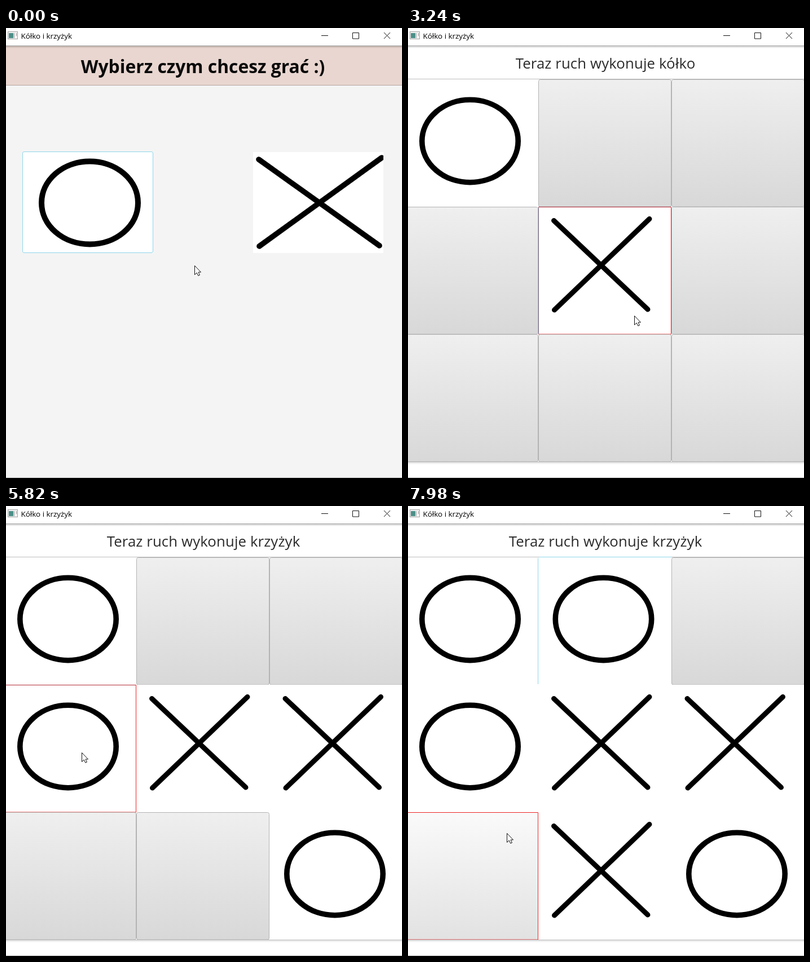
An HTML page for the animation above (8000 ms loop, 702 by 798 pixels).

```html
<!DOCTYPE html>
<html lang="pl">
<head>
<meta charset="utf-8">
<style>
  html, body { margin: 0; width: 100%; height: 100%; overflow: hidden; background: #fff; }
  svg { display: block; width: 702px; height: 798px; }
  text { font-family: "Open Sans", "Noto Sans", sans-serif; }
  .title { font-size: 13.4px; fill: #000; }
  .head { font-size: 31.8px; font-weight: 700; fill: #0a0a0a; text-anchor: middle; }
  .turn { font-family: "Comic Sans MS", "Comic Neue", "Open Sans", sans-serif; font-size: 25.8px; letter-spacing: .1px; fill: #2b2b2b; text-anchor: middle; }
  .ink { fill: none; stroke: #000; stroke-linecap: round; }
  .line { fill: none; stroke-width: 1; }
</style>
</head>
<body>
<svg viewBox="0 0 702 798" xmlns="http://www.w3.org/2000/svg">
  <defs>
    <linearGradient id="idle" x2="0" y2="1"><stop stop-color="#efefef"/><stop offset="1" stop-color="#d8d8d8"/></linearGradient>
    <linearGradient id="over" x2="0" y2="1"><stop stop-color="#fafafa"/><stop offset="1" stop-color="#e2e2e2"/></linearGradient>
    <linearGradient id="down" x2="0" y2="1"><stop stop-color="#e6e6e6"/><stop offset="1" stop-color="#d0d0d0"/></linearGradient>
    <linearGradient id="shade" x2="0" y2="1"><stop stop-color="#000" stop-opacity=".2"/><stop offset="1" stop-color="#000" stop-opacity="0"/></linearGradient>
    <clipPath id="tile"><rect x="438" y="220" width="231" height="179"/></clipPath>
  </defs>

  <g id="menu">
    <rect y="31" width="702" height="767" fill="#f4f4f4"/>
    <rect y="31" width="702" height="70" fill="#e9d6d0"/>
    <path class="line" d="M0 101.5H702" stroke="#b5a5a0"/>
    <text class="head" x="349" y="80">Wybierz czym chcesz grać :)</text>
    <rect x="30" y="220" width="231" height="179" fill="#fff"/>
    <ellipse class="ink" cx="148.5" cy="310" rx="85.5" ry="73.5" stroke-width="10"/>
    <rect id="pick" class="line" x="29.5" y="219.5" width="231" height="179" rx="2.5"/>
    <rect x="438" y="220" width="231" height="179" fill="#fff"/>
    <path class="ink" clip-path="url(#tile)" d="M448 233L662 386M449 387L666 230" stroke-width="9.6"/>
  </g>

  <g id="game">
    <rect y="31" width="702" height="767" fill="#fff"/>
    <text id="turn" class="turn" x="350" y="72"></text>
    <g id="cells"></g>
    <path class="line" d="M0 90.5H702M0 769.5H702" stroke="#bdbdbd"/>
    <rect y="770" width="702" height="4" fill="url(#shade)" opacity=".6"/>
    <g id="focus"></g>
  </g>

  <g id="bar">
    <rect width="702" height="31" fill="#fff"/>
    <rect y="32" width="702" height="4" fill="url(#shade)"/>
    <path class="line" d="M0 31.5H702" stroke="#a6a6a6"/>
    <rect x="3.5" y="6.5" width="17" height="13" fill="#f3f3f3" stroke="#a2a2a2"/>
    <rect x="5" y="9" width="8" height="9" fill="#4b8f88"/>
    <path class="line" d="M14.5 9V18M18.5 9V14" stroke="#9a9a9a"/>
    <text class="title" x="26.5" y="19">Kółko i krzyżyk</text>
    <path class="line" d="M559 13.5H571M614.5 8.5H625.5V19H614.5ZM670 8L681 19M681 8L670 19" stroke="#111"/>
    <path class="line" d="M0 797.5H702" stroke="#b4b4b4"/>
  </g>

  <path id="cursor" d="M.5 .5V16.5L4.2 13L6.8 18.3L9.4 17.1L7 12H11.5Z" fill="#fff" stroke="#111" stroke-width="1"/>
</svg>

<script>
const LOOP = 8000, GAME = 1450, WAKE = 1850;
const RED = '#ee2222', SKY = '#8fd6ea';
const LEFT = [-5, 231, 467], TOP = [91, 317, 543];

// start, end, number of steps, bend point, goal
const moves = [
  [200, 750, 8, [385, 640], [210, 331]],
  [1850, 1927, 2, [200, 285], [185, 240]],
  [2230, 2630, 6, [270, 340], [385, 480]],
  [3240, 3630, 6, [424.5, 572], [560, 640]],
  [4176, 4710, 8, [565, 550], [549, 448]],
  [5200, 5665, 7, [340, 455], [134, 437]],
  [5970, 6440, 7, [220, 560], [340, 640]],
  [7050, 7430, 6, [340, 430], [358, 237]],
  [7740, 7980, 4, [280, 400], [175, 580]]
];

// cell, press, release, sign
const plays = [
  [0, 2003, 2080, 'O'], [4, 2780, 2860, 'X'], [8, 3930, 4100, 'O'], [5, 4880, 4950, 'X'],
  [3, 5742, 5820, 'O'], [7, 6590, 6670, 'X'], [1, 7510, 7590, 'O']
];

const $ = id => document.getElementById(id);
const show = (id, on) => $(id).style.display = on ? '' : 'none';

function pointer(t) {
  let pos = [334, 421];
  for (const [from, to, n, bend, goal] of moves) {
    if (t < from) break;
    const step = Math.floor((t - from) * (n - 1) / (to - from) + 1e-6) + 1;
    const s = Math.min(step, n) / n, r = 1 - s;
    pos = pos.map((p, i) => r * r * p + 2 * r * s * bend[i] + s * s * goal[i]);
  }
  return pos;
}

const line = (d, color, width = 1) =>
  `<path class="line" d="${d}" stroke="${color}" style="stroke-width:${width}"/>`;

function sign(kind, col, row) {
  const dx = col * 236.5, dy = row * 226;
  return kind === 'O'
    ? `<ellipse class="ink" cx="${110 + dx}" cy="${200.5 + dy}" rx="85.2" ry="73.2" stroke-width="9.6"/>`
    : `<path class="ink" d="M22 115.5L188.5 273M23 274L191.5 112.5" transform="translate(${dx} ${dy})" stroke-width="9"/>`;
}

function cell(i, s) {
  const col = i % 3, row = Math.floor(i / 3), x = LEFT[col], y = TOP[row];
  const hover = s.hover === i, focus = s.focus === i, kind = s.board[i];
  const l = x + .5, u = y + .5, r = x + 235.5, b = y + 226;
  let out;
  if (kind) {
    out = `<rect x="${x}" y="${y}" width="236" height="226" fill="#fff"/>` + sign(kind, col, row);
  } else {
    const fill = hover ? (s.pressed ? 'down' : 'over') : 'idle';
    out = `<rect x="${l}" y="${u}" width="235" height="225.5" rx="${hover ? 0 : 3}" fill="url(#${fill})" stroke="${hover ? 'none' : '#b3b3b3'}"/>`;
  }
  if (hover) {
    out += line(`M${r} ${u}V${b}H${l}`, RED);
    out += line(`M${l} ${b}V${u}`, focus ? '#76688a' : RED);
    out += line(`M${l} ${u}H${r}`, focus ? '#b52c38' : RED);
  }
  return out;
}

function focusLine(s) {
  if (s.focus === s.hover) return '';
  if (s.fresh) return line('M0 92H228Q230 92 230 94V315Q230 317 228 317', '#1f9fd0', 2) + line('M0 317.5H229', '#79bcd3');
  const x = LEFT[s.focus % 3], y = TOP[Math.floor(s.focus / 3)];
  return line(`M${x - .5} ${y + 225}V${y + 1}M${x + 1} ${y - .5}H${x + 235}`, SKY);
}

function state(t, x, y) {
  const s = { board: [], focus: 0, hover: -1, pressed: false, turn: 'kółko', fresh: t < WAKE };
  for (const [i, press, release, kind] of plays) {
    if (t < press) break;
    s.focus = i;
    s.pressed = t < release;
    if (s.pressed) break;
    s.board[i] = kind;
    s.turn = kind === 'O' ? 'krzyżyk' : 'kółko';
  }
  if (!s.fresh) s.hover = (x < 231 ? 0 : x < 467 ? 1 : 2) + (y < 317 ? 0 : y < 543 ? 3 : 6);
  return s;
}

let last = '';
function draw(t) {
  const [x, y] = pointer(t), playing = t >= GAME;
  $('cursor').setAttribute('transform', `translate(${Math.round(x)} ${Math.round(y)})`);
  show('menu', !playing);
  show('game', playing);
  $('pick').setAttribute('stroke', x < 261 && y < 399 ? RED : SKY);
  if (!playing) return;
  const s = state(t, x, y), key = JSON.stringify(s);
  if (key === last) return;
  last = key;
  $('turn').textContent = s.board.length ? `Teraz ruch wykonuje ${s.turn}` : `Teraz wykonuje ruch ${s.turn}`;
  $('cells').innerHTML = [0, 1, 2, 3, 4, 5, 6, 7, 8].map(i => cell(i, s)).join('');
  $('focus').innerHTML = focusLine(s);
}

const start = performance.now();
function tick() {
  draw((performance.now() - start) % LOOP);
  requestAnimationFrame(tick);
}
tick();
</script>
</body>
</html>
```
